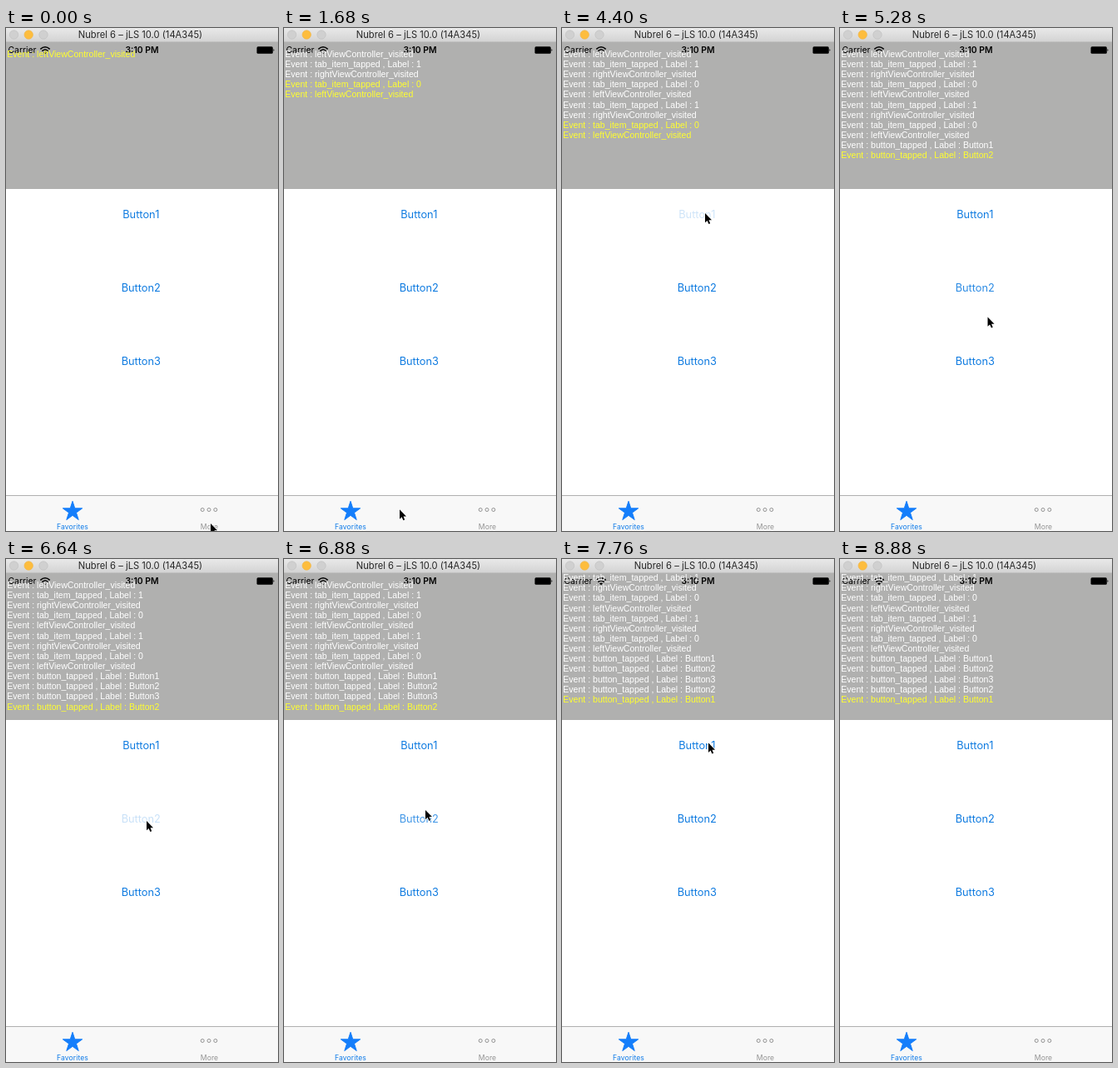
These frames come from a looping animation (327x603 px, 8960 ms). An HTML page:

```html
<!DOCTYPE html>
<html lang="en">
<head>
<meta charset="utf-8">
<title>Event log</title>
<style>
  html, body { margin: 0; width: 100%; height: 100%; overflow: hidden; background: #fff; }
  svg { display: block; width: 100%; height: 100%; }
  text { font-family: Inter, Roboto, sans-serif; white-space: pre; }
  .mid { text-anchor: middle; }
  .title { font-size: 11.2px; fill: #262626; }
  .status { font-size: 10.4px; fill: #000; }
  .clock { font-weight: 600; }
  #log text { font: 10.55px "Liberation Sans", Arial, sans-serif; fill: #fff; }
  #log text.new { fill: #ffff2e; }
  .button { font-size: 12.8px; fill: #0f7be0; }
  .tab { font-size: 8.6px; letter-spacing: .1px; fill: #929292; }
  .icon { fill: none; stroke: #929292; stroke-width: 1; }
  .on .tab { fill: #0f7be8; }
  .on .icon { fill: #147efb; stroke: #147efb; }
</style>
</head>
<body>
<svg viewBox="0 0 327 603">
  <defs>
    <linearGradient id="bar" x2="0" y2="1">
      <stop stop-color="#e9e9e9"/><stop offset="1" stop-color="#d3d3d3"/>
    </linearGradient>
    <clipPath id="panel"><path d="M0 16.5H327V193H0Z"/></clipPath>
  </defs>

  <path fill="#fff" d="M0 0H327V603H0Z"/>
  <path fill="#b0b0af" d="M0 16H327V193H0Z"/>

  <path fill="url(#bar)" d="M0 0H327V16.5H0Z"/>
  <g stroke-width=".7">
    <circle cx="9.5" cy="8" r="5.2" fill="#d0d0d0" stroke="#c2c2c2"/>
    <circle cx="27.2" cy="8" r="5.2" fill="#fdbd3e" stroke="#f0b548"/>
    <circle cx="45" cy="8" r="5.2" fill="#d0d0d0" stroke="#c2c2c2"/>
  </g>
  <text class="title mid" x="161.5" y="12">Nubrel 6 – jLS 10.0 (14A345)</text>

  <text class="status" x="2.5" y="30.4">Carrier</text>
  <g fill="none" stroke="#000" stroke-width="1.5">
    <path d="M41.3 25.4Q47 20.2 52.7 25.4M43.4 27.6Q47 24.4 50.6 27.6"/>
    <path fill="#000" stroke="none" d="M45 29.3Q47 27.6 49 29.3L47 31.3Z"/>
  </g>
  <text class="status clock mid" x="163.5" y="30.4">3:10 PM</text>
  <rect x="301.5" y="22.3" width="19.3" height="8.4" rx="1.5"/>
  <path d="M321.5 25Q323.4 26.5 321.5 28Z"/>
  <g clip-path="url(#panel)"><g id="log"></g></g>

  <g id="page"></g>

  <path fill="#f8f8f8" d="M0 560H327V603H0Z"/>
  <path fill="#b0b0b0" d="M0 560H327V561H0Z"/>
  <g id="favorites">
    <path class="icon" id="star"/>
    <text class="tab mid" x="80" y="601">Favorites</text>
  </g>
  <g id="more">
    <g class="icon">
      <circle cx="236.2" cy="577.5" r="2"/><circle cx="244" cy="577.5" r="2"/><circle cx="251.8" cy="577.5" r="2"/>
    </g>
    <text class="tab mid" x="244.5" y="601">More</text>
  </g>

  <path id="cursor" stroke="#fff" stroke-width="1.4" stroke-linejoin="round" paint-order="stroke"
    d="M0 0V11.3L2.6 8.9L4.4 13L6.2 12.2L4.5 8.2H8Z"/>
</svg>
<script>
const LOOP = 8960, STEP = 80, PITCH = 12.15, SCROLL = 20.8;
const $ = id => document.getElementById(id);

const visit = side => `Event : ${side}ViewController_visited`;
const tabTap = n => [`Event : tab_item_tapped , Label : ${n}`, visit(n ? 'right' : 'left')];
const press = n => [`Event : button_tapped , Label : Button${n}`];

// Each action: time, log lines, and the tab or button it touches.
const actions = [
  { at: 0, lines: [visit('left')], tab: 0 },
  ...[[320, 1], [1120, 0], [2320, 1], [3520, 0]].map(([at, tab]) => ({ at, lines: tabTap(tab), tab })),
  ...[[4480, 1], [4960, 2], [5760, 3], [6600, 2], [7280, 1]].map(([at, button]) => ({ at, lines: press(button), button }))
];

// Pointer stops: time, x, y.
const stops = [
  [0, 246, 594], [480, 246, 594], [1000, 82, 578], [1480, 82, 578], [1995, 252, 576],
  [2640, 250, 578], [3460, 84, 578], [3900, 83, 581], [4380, 172, 222], [4600, 172, 222],
  [4860, 180, 310], [5060, 180, 310], [5560, 174, 399], [5960, 174, 399], [6420, 169, 314],
  [6800, 169, 314], [7140, 176, 220.6], [7840, 176, 220.6], [8320, 150, -30], [LOOP, 150, -30]
];

const clamp = v => Math.min(1, Math.max(0, v));
const smooth = u => u * u * (3 - 2 * u);
const ramp = (t, start, length) => smooth(clamp((t - start) / length));

function addText(parent, className, x, y, content) {
  const el = document.createElementNS('http://www.w3.org/2000/svg', 'text');
  el.setAttribute('class', className);
  el.setAttribute('x', x);
  el.setAttribute('y', y);
  el.textContent = content;
  return parent.appendChild(el);
}

const rows = actions.flatMap((action, group) => action.lines.map(line => ({ line, group })))
  .map(({ line, group }, i) => ({ group, el: addText($('log'), '', 1.3, 34.8 + i * PITCH, line) }));
const buttons = [1, 2, 3].map(n => addText($('page'), 'button mid', 162.3, 139.8 + 88 * n, `Button${n}`));

$('star').setAttribute('d', 'M' + Array.from({ length: 10 }, (_, i) => {
  const r = i % 2 ? 4.7 : 12.3, a = i * Math.PI / 5;
  return `${80 + r * Math.sin(a)} ${579.6 - r * Math.cos(a)}`;
}).join('L') + 'Z');

function pointerAt(t) {
  const i = stops.findIndex(s => s[0] > t);
  const [t0, x0, y0] = stops[i - 1], [t1, x1, y1] = stops[i];
  const u = ramp(t, t0, t1 - t0);
  return [x0 + (x1 - x0) * u, y0 + (y1 - y0) * u];
}

// Dimmed while held, then fading back after release.
function buttonAlpha(n, t) {
  const taps = actions.filter(a => a.button === n);
  return Math.min(...taps.map(({ at }) => t < at - 100 ? 1 : 0.2 + 0.8 * ramp(t, at, 430)));
}

function draw(t) {
  const current = actions.filter(a => a.at <= t).length - 1;
  const tab = actions.slice(0, current + 1).filter(a => 'tab' in a).pop().tab;
  for (const { group, el } of rows) {
    el.style.display = group <= current ? '' : 'none';
    el.setAttribute('class', group === current ? 'new' : '');
  }
  $('log').setAttribute('transform', `translate(0 ${-SCROLL * ramp(t, 7280, 300)})`);
  $('page').style.display = tab ? 'none' : '';
  $('favorites').setAttribute('class', tab ? '' : 'on');
  $('more').setAttribute('class', tab ? 'on' : '');
  buttons.forEach((el, i) => el.style.opacity = buttonAlpha(i + 1, t));
  $('cursor').setAttribute('transform', `translate(${pointerAt(t)})`);
}

const begin = performance.now();
function tick() {
  const t = (performance.now() - begin) % LOOP;
  draw(Math.floor(t / STEP) * STEP);
  requestAnimationFrame(tick);
}
tick();
</script>
</body>
</html>
```
